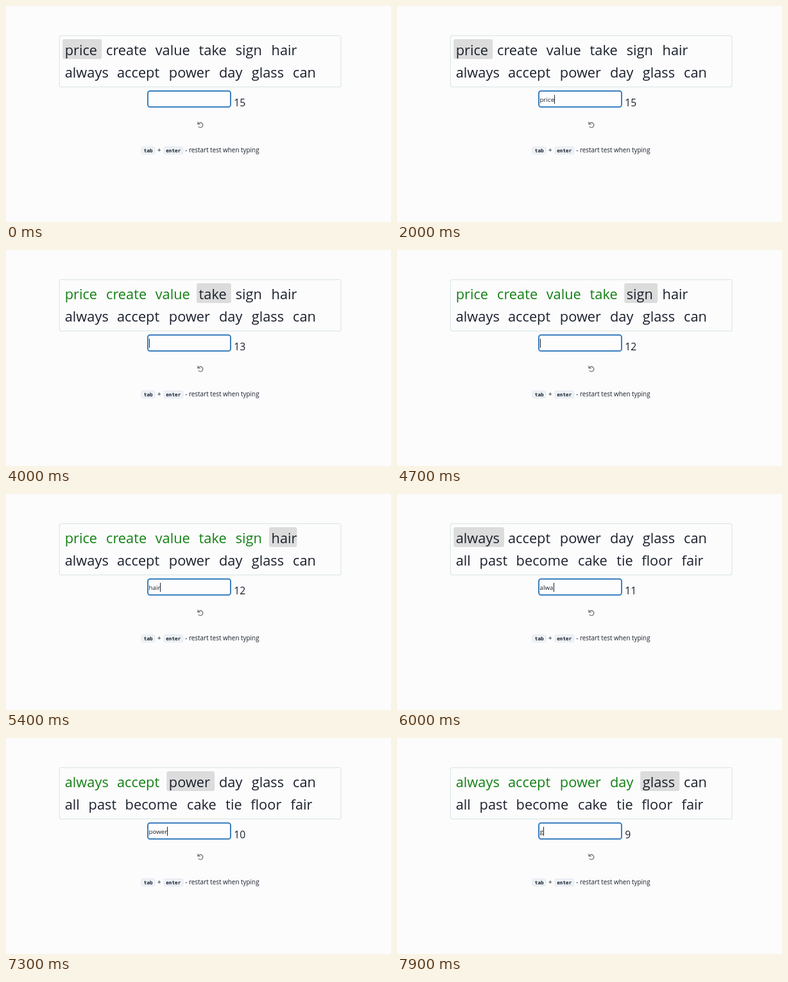
Recreate the animation shown at these times as an HTML page. Size 600 by 338 pixels, loop 8000 ms.

```html
<!DOCTYPE html>
<html lang="en">
<head>
<meta charset="utf-8">
<title>Typing test</title>
<style>
  html, body { margin: 0; width: 100%; height: 100%; overflow: hidden; background: #fcfcfd; }
  svg { display: block; width: 600px; height: 338px; }
  text { font: 9.75px "Open Sans", "Noto Sans", sans-serif; fill: #1a202c; }
  #words text { font-size: 21.8px; }
  #words .done { fill: #138013; }
  #timer { font-size: 15.8px; }
  #hint text { font-size: 9.92px; }
  #hint .key { font: bold 7.7px "DejaVu Sans Mono", monospace; }
  #hint rect { fill: #edf2f7; stroke: #dfe5ec; stroke-width: .8; }
</style>
</head>
<body>
<svg viewBox="0 0 600 338">
  <rect x="83.3" y="46.3" width="438.7" height="80.4" rx="3" fill="none" stroke="#dfe8e8" stroke-width="1.3"/>
  <rect id="mark" y="52" height="31" rx="3" fill="#dcdcdc"/>
  <g id="words"></g>
  <rect x="221" y="133" width="129" height="25" rx="3.5" fill="#fdfdfe" stroke="#3b80bf" stroke-width="2"/>
  <text id="entry" x="222.6" y="150"></text>
  <rect id="caret" y="139" width="1" height="14" fill="#1a202c"/>
  <text id="timer" x="355.2" y="156.5"></text>
  <path d="M299 181.3v3.7h3.9M299.4 184.7a3.9 3.9 0 1 1 .3 3.8" fill="none" stroke="#666" stroke-width="1.2"/>
  <g id="hint">
    <rect x="211" y="220.4" width="21" height="11.4" rx="2.5"/>
    <text class="key" x="214.8" y="228.6">tab</text>
    <text x="236" y="228.6">+</text>
    <rect x="246" y="220.4" width="30" height="11.4" rx="2.5"/>
    <text class="key" x="249.2" y="228.6">enter</text>
    <text x="279.2" y="228.6">- restart test when typing</text>
  </g>
</svg>
<script>
const LOOP = 8000, START = 1700, ROW = 6;
const $ = id => document.getElementById(id);

// word and its left edge, row by row
const rows = [
  "price 91.7 create 156 value 232.7 take 300.6 sign 357.7 hair 413.5",
  "always 91.7 accept 173 power 253.8 day 332 glass 382.7 can 447",
  "all 91.7 past 128.6 become 185.6 cake 282 tie 342.2 floor 381.2 fair 443.6"
];

// tenths of a second, then the keys pressed; _ is the space bar
const keys = ("17p 18r 19ic 20e 21_ 22c 24r 26e 27a 28te 29_ 30v 33a 34l 36u 38e 39_ " +
  "42t 44a 45k 46e 47_ 48s 49ig 50n 51_ 52h 53ai 54r 55_ 57a 58l 59w 60a 61y 62s 63_ " +
  "64ac 66ce 67p 69t 70_ 71po 73wer 74_ 75d 76ay 77_ 79g")
  .split(" ").map(k => ({ time: parseInt(k) * 100, text: k.slice(2) }));

const words = rows.flatMap((line, row) =>
  [...line.matchAll(/(\w+) ([\d.]+)/g)].map(([, text, x]) => {
    const el = document.createElementNS("http://www.w3.org/2000/svg", "text");
    el.textContent = text;
    el.setAttribute("x", x);
    $("words").append(el);
    return { el, row, x: +x };
  }));

function draw(t) {
  const typed = keys.filter(k => k.time <= t).map(k => k.text).join("").split("_");
  const current = typed.length - 1;
  const top = Math.floor(current / ROW);

  words.forEach(({ el, row }, i) => {
    el.setAttribute("y", 77 + 35 * (row - top));
    el.setAttribute("class", i < current ? "done" : "");
    el.style.display = row < top || row > top + 1 ? "none" : "";
  });

  const { el, x } = words[current];
  const lastInRow = current % ROW === ROW - 1;
  $("mark").setAttribute("x", x - 3.5);
  $("mark").setAttribute("width", el.getComputedTextLength() + 3.5 + (lastInRow ? 0 : 7.2));

  const entry = $("entry");
  entry.textContent = typed[current];
  const width = typed[current] ? entry.getComputedTextLength() : 0;
  $("caret").setAttribute("x", Math.round(222.6 + width));
  $("caret").style.display = t < 200 || (t >= 800 && t < 1300) ? "none" : "";

  $("timer").textContent = 15 - Math.max(0, Math.floor((t - START) / 1000));
}

function tick() {
  draw(performance.now() % LOOP);
  requestAnimationFrame(tick);
}
tick();
</script>
</body>
</html>
```
